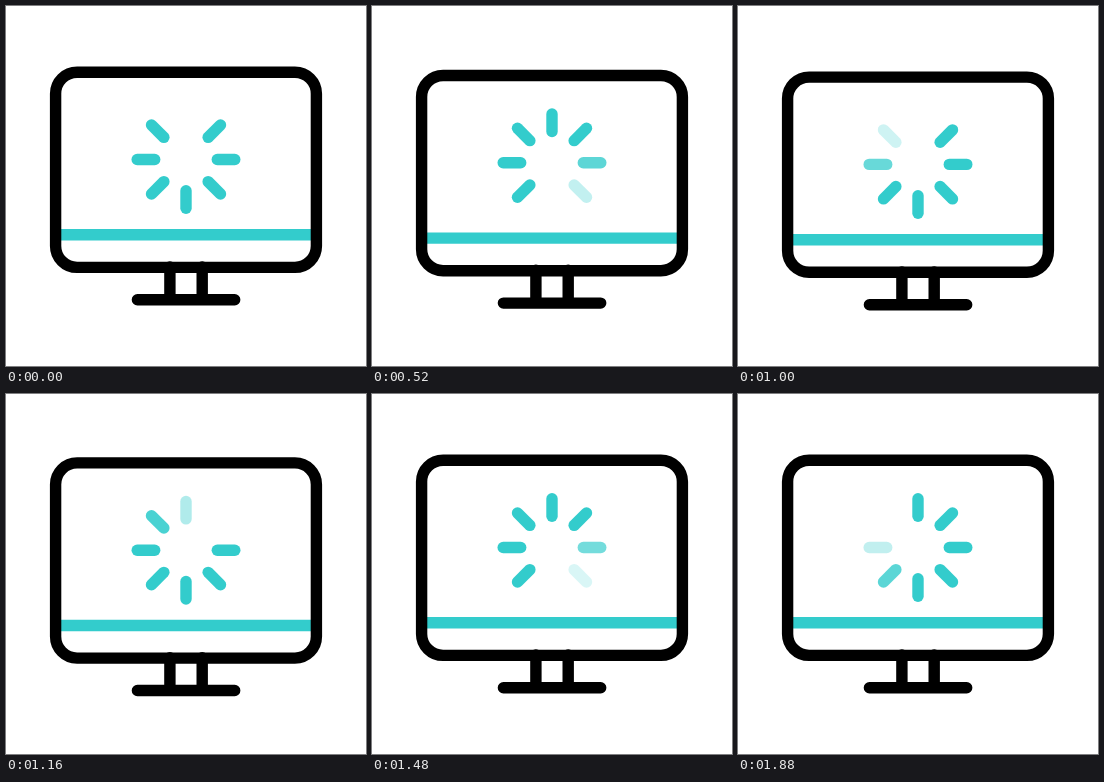
Write an HTML page that moves like this. It is 360x360 px and loops after 1920 ms.

```html
<!DOCTYPE html>
<html lang="en">
<head>
<meta charset="utf-8">
<title>Loading monitor</title>
<style>
  html, body { margin: 0; width: 100%; height: 100%; overflow: hidden; background: #fff; }
  svg { display: block; width: 100vw; height: 100vh; }
</style>
</head>
<body>
<svg viewBox="0 0 360 360" fill="none" stroke-width="11.4" stroke-linecap="round">
  <g id="monitor">
    <path d="M55 228.8H305" stroke="#33cccc" stroke-linecap="butt"/>
    <g stroke="#000">
      <rect x="49.6" y="66.2" width="260.8" height="195.2" rx="21.5"/>
      <path d="M163.9 261V293.8M196.2 261V293.8M131.4 293.8H228.7"/>
    </g>
    <g id="spinner" stroke="#33cccc" transform="translate(180 153.5)"></g>
  </g>
</svg>
<script>
  const LOOP = 1920, STEP = 40;
  const SPOKES = 8, SPOKE_DELAY = 123.5, SPIN_START = 76;
  const DIP = 6, DIP_PEAK = 820, DIP_HALF = 640;

  const monitor = document.getElementById('monitor');
  const spinner = document.getElementById('spinner');

  const spokes = Array.from({ length: SPOKES }, (_, i) => {
    const spoke = document.createElementNS('http://www.w3.org/2000/svg', 'path');
    spoke.setAttribute('d', 'M0 -31.3V-48.8');
    spoke.setAttribute('transform', `rotate(${i * 360 / SPOKES})`);
    return spinner.appendChild(spoke);
  });

  function dipAt(t) {
    const x = Math.min(1, Math.abs(t - DIP_PEAK) / DIP_HALF);
    return DIP * (1 + Math.cos(Math.PI * x)) / 2;
  }

  // Each spoke blinks out for one beat, then fades back over two.
  function spokeOpacity(index, beat) {
    for (let turn = index; turn <= beat + 1; turn += SPOKES) {
      const age = beat - turn;
      if (age < 2) return Math.max(0, age / 2);
    }
    return 1;
  }

  function render(time) {
    const t = Math.floor((time % LOOP) / STEP) * STEP;
    const beat = (t - SPIN_START) / SPOKE_DELAY;
    monitor.setAttribute('transform', `translate(0 ${dipAt(t).toFixed(3)})`);
    spokes.forEach((spoke, i) => spoke.setAttribute('opacity', spokeOpacity(i, beat).toFixed(3)));
  }

  const start = performance.now();
  function tick() {
    render(performance.now() - start);
    requestAnimationFrame(tick);
  }
  tick();
</script>
</body>
</html>
```
